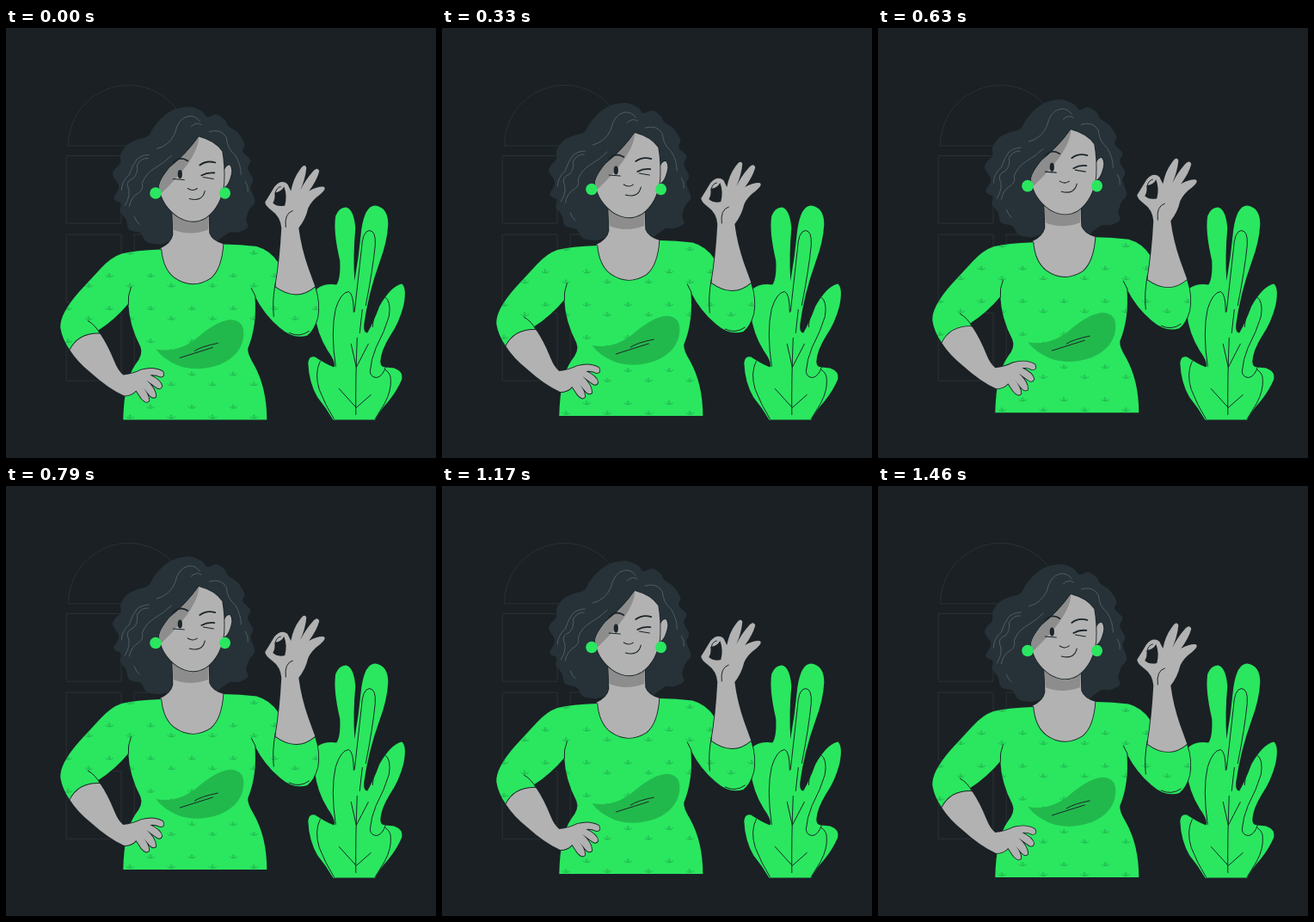
Write an HTML page with a canvas that moves like this. It is 500x500 px and loops after 1.5 s.

```html
<!DOCTYPE html>
<html lang="en">
<head>
<meta charset="utf-8">
<title>Winking woman</title>
<style>
  html, body { margin: 0; width: 100%; height: 100%; overflow: hidden; background: #1a2024; }
  canvas { display: block; }
</style>
</head>
<body>
<canvas id="stage" width="500" height="500"></canvas>
<script>
const ctx = document.getElementById('stage').getContext('2d');
const BG = '#1a2024', DOOR = '#2a3034', HAIR = '#263238', SKIN = '#b2b2b2',
      SHADE = '#8d8d8d', GREEN = '#2ae75f', LEAF = '#22b94c', INK = '#1c2529', STRAND = '#5b686e';
const LOOP = 1500, STEPS = 36, RISE = 10;

// Closed smooth outline through a few points.
function smooth(points) {
  const path = new Path2D(), n = points.length;
  const at = i => points[(i + n) % n];
  path.moveTo(...points[0]);
  for (let i = 0; i < n; i++) {
    const [a, b, c, d] = [at(i - 1), at(i), at(i + 1), at(i + 2)];
    path.bezierCurveTo(b[0] + (c[0] - a[0]) / 6, b[1] + (c[1] - a[1]) / 6,
                       c[0] - (d[0] - b[0]) / 6, c[1] - (d[1] - b[1]) / 6, c[0], c[1]);
  }
  path.closePath();
  return path;
}

function fill(path, color) {
  ctx.fillStyle = color;
  ctx.fill(path);
}

function line(path, color = INK, width = 1) {
  ctx.strokeStyle = color;
  ctx.lineWidth = width;
  ctx.stroke(path);
}

// Filled shape whose outline lies outside its edge.
function outlined(path, color) {
  line(path, INK, 1.8);
  fill(path, color);
}

function dot(x, y, rx, ry, color) {
  const path = new Path2D();
  path.ellipse(x, y, rx, ry, 0, 0, Math.PI * 2);
  fill(path, color);
}

const hair = smooth([
  [213, 91], [227, 96], [234, 103], [244, 100], [254, 106], [258, 113], [269, 121], [277, 134],
  [275, 143], [284, 153], [281, 163], [287, 176], [284, 185], [289, 201], [283, 210], [279, 222],
  [281, 231], [270, 237], [260, 237], [251, 243], [240, 249], [214, 242], [190, 248], [178, 251],
  [163, 248], [156, 238], [143, 234], [139, 222], [132, 212], [134, 204], [125, 198], [131, 184],
  [124, 171], [126, 164], [133, 156], [133, 146], [141, 135], [153, 129], [165, 125], [172, 114],
  [183, 102], [196, 94]
]);

const strands = new Path2D(`M175 140 Q190 136 196 122 Q200 104 212 102 Q220 101 225 108
  M138 206 Q146 193 141 183 Q140 177 148 174 Q154 167 152 159 Q157 150 165 151
  M134 188 Q134 178 143 170 Q147 158 152 152 Q158 147 166 147
  M143 207 Q145 196 154 191 Q160 187 158 180 Q162 169 172 163 Q184 156 192 148
  M215 114 Q221 108 227 112 M236 120 Q250 116 256 127 Q257 140 266 147 Q273 158 273 170
  M278 178 Q282 184 281 190 M149 219 Q151 225 155 228`);

const neck = new Path2D(`M193 205 L194 240 Q192 250 179 256 Q182 282 196 291 Q216 304 238 291
  Q252 278 253 251 Q239 247 236 238 L235 205Z`);
const neckShade = new Path2D('M193 205 L194 234 Q214 242 235 234 V205Z');
const face = new Path2D(`M224 126 Q243 131 251 143 Q254 160 253 180 Q250 207 232 220
  Q217 229 200 219 Q181 206 178 185 Q177 178 190 162 Q210 146 224 126Z`);
const faceShade = new Path2D('M224 126 Q224 139 210 159 Q199 174 180 192 L178 185 Q177 178 190 162 Q210 146 224 126Z');
const ear = new Path2D('M253 166 Q256 158 260 159 Q264 164 260 175 Q257 184 252 185Z');

const thinFeatures = new Path2D(`M194 175 L207 176 M211 186 Q217 190 222 186
  M213 198 Q228 202 231 189 M229 173 L241 175`);
const boldFeatures = new Path2D('M194 156 Q202 148 211 154 M225 159 Q233 153 243 156 M227 171 Q234 167 242 168');

const dress = new Path2D(`M180 257 Q150 258 134 262 Q122 266 110 279 L85 306 Q62 332 63 348
  Q65 361 74 374 Q84 353 109 355 L107 351 Q126 339 142 320 Q143 345 156 370 Q160 379 150 391
  Q137 410 136 455 H303 Q303 418 288 391 Q280 378 281 372 Q292 345 289 311
  Q300 333 318 348 Q334 362 350 357 Q358 351 362 336 Q365 319 359 301 L316 272
  Q307 258 291 253.5 Q272 251 253 251 Q251 280 238 291 Q216 305 195 290 Q182 280 180 257Z`);
const folds = new Path2D(`M145 301 Q141 311 142 321 M285 302 L290 312
  M95 340 Q104 345 109 355 M313 296 Q309 316 311 335 M329 354 Q341 360 352 352`);
const dressLeaf = new Path2D(`M174 373 Q202 378 225 357 Q250 337 264 339 Q277 341 276 357
  Q274 380 248 391 Q222 400 200 392 Q183 385 174 373Z`);
const leafVeins = new Path2D('M202 383 L240 371 M219 375 Q226 370 246 366');
const sprig = new Path2D('M-4.5 -.5 Q-3 1.5 -1.3 1.3 M4.5 -.5 Q3 1.5 1.3 1.3 M-1.2 -1 L0 1.8 L1.2 -1 L0 -2.5Z');

const hipArm = new Path2D(`M74 374 Q84 354 109 355 Q118 368 126 388 Q130 398 136 403
  Q147 402 157 397 Q172 393 182 399 Q185 405 179 405 Q173 402 167 403 Q180 409 181 416
  Q179 421 174 417 L163 409 Q174 419 174 428 Q171 431 167 427 L157 415 Q166 425 166 433
  Q163 437 157 430 L151 421 Q146 427 137 427 Q119 419 98 400 Q83 388 74 374Z`);
const raisedArm = new Path2D(`M320 232 Q319 219 309 212 Q301 206 301 202 Q306 194 312 184
  Q320 175 327 181 L331 189 Q334 174 341 165 Q347 156 349 162 Q348 174 342 188
  Q348 176 356 167 Q362 160 364 166 Q361 177 352 189 Q361 184 368 184 Q374 185 365 193
  Q355 200 351 209 Q348 222 340 232 Q343 255 351 278 Q355 289 359 300
  Q338 318 313 300 Q318 270 320 232Z`);
const fingerLoop = new Path2D('M312 191 Q320 190 323 184 Q327 194 324 206 Q315 208 310 203 Q313 198 312 191Z');
const handLines = new Path2D('M325 231 Q323 215 333 212 M313 191 Q314 185 319 184');

const plant = new Path2D(`M361 303 Q370 296 384 298 Q389 291 388 270 Q380 236 383 218
  Q387 208 395 208 Q404 210 406 232 Q403 264 405 294 Q410 265 413 234 Q417 206 429 206
  Q444 208 444 228 Q443 248 434 272 Q421 308 416 344 Q415 354 420 354 Q427 342 434 323
  Q447 300 460 297 Q466 302 462 322 Q457 342 446 358 Q436 374 435 387 Q435 394 441 394
  L451 395 Q462 399 460 408 Q454 422 444 434 Q434 445 429 455 H380
  Q372 441 362 429 Q352 412 351 389 Q352 380 359 382 Q371 390 381 394 Q384 389 374 375
  Q361 354 359 332Z`);
const plantVeins = new Path2D(`M383 393 Q377 352 383 326 Q389 307 398 306 Q404 308 404 330
  M405 329 L413 257 Q414 236 422 235 Q430 235 429 252 Q426 282 418 322
  M426 347 Q427 319 440 312 Q448 317 445 335 Q440 352 430 371 Q424 385 423 399
  Q424 406 431 406 Q438 404 441 394
  M406.5 449 Q406 408 408 360 M401 367 L407 394 L421 367 M414 327 L411 354
  M387 419 L407 441 L424 426 M365 387 Q358 401 364 420 Q371 438 381 454
  M441 397 Q447 401 447 408 Q448 421 440 436 L429 454`);

function drawDoor() {
  const door = new Path2D();
  door.arc(142.5, 136.5, 70, Math.PI, 0);
  door.closePath();
  for (const x of [70.5, 149.5])
    for (const y of [148.5, 240, 331.5]) door.rect(x, y, 63.5, 78.7);
  line(door, DOOR);
}

function drawPattern() {
  ctx.save();
  ctx.clip(dress);
  for (let col = 0; col < 13; col++) {
    for (let row = 0; row < 6; row++) {
      ctx.save();
      ctx.translate(72 + col * 24, 261 + row * 38.2 + (col % 2 ? 0 : 26.5));
      line(sprig, '#20a84c', 0.8);
      ctx.restore();
    }
  }
  ctx.restore();
}

function drawHead() {
  fill(hair, HAIR);
  line(strands, STRAND, 0.8);
  outlined(neck, SKIN);
  fill(neckShade, SHADE);
  outlined(ear, SKIN);
  outlined(face, SKIN);
  fill(faceShade, SHADE);
  dot(202, 169.5, 2.6, 5, INK);
  line(thinFeatures, INK, 1.1);
  line(boldFeatures, INK, 1.8);
  dot(173.7, 191.5, 6.8, 6.8, GREEN);
  dot(254.3, 191.5, 6.4, 6.8, GREEN);
}

function drawBody() {
  outlined(dress, GREEN);
  drawPattern();
  fill(dressLeaf, LEAF);
  line(leafVeins);
  outlined(hipArm, SKIN);
  outlined(raisedArm, SKIN);
  fill(fingerLoop, BG);
  line(handLines);
  line(folds);
}

// Linear bob up and back down, held at 24 steps per second.
function lift(time) {
  const phase = Math.floor((time % LOOP) / LOOP * STEPS + 0.1) % STEPS / STEPS;
  return RISE * (1 - Math.abs(1 - 2 * phase));
}

function draw(time) {
  ctx.fillStyle = BG;
  ctx.fillRect(0, 0, 500, 500);
  ctx.lineCap = ctx.lineJoin = 'round';
  drawDoor();
  ctx.save();
  ctx.translate(0.3, 0.5);
  outlined(plant, GREEN);
  line(plantVeins);
  ctx.translate(0, -lift(time));
  drawHead();
  drawBody();
  ctx.restore();
}

const start = performance.now();
function tick() {
  draw(performance.now() - start);
  requestAnimationFrame(tick);
}
tick();
</script>
</body>
</html>
```
